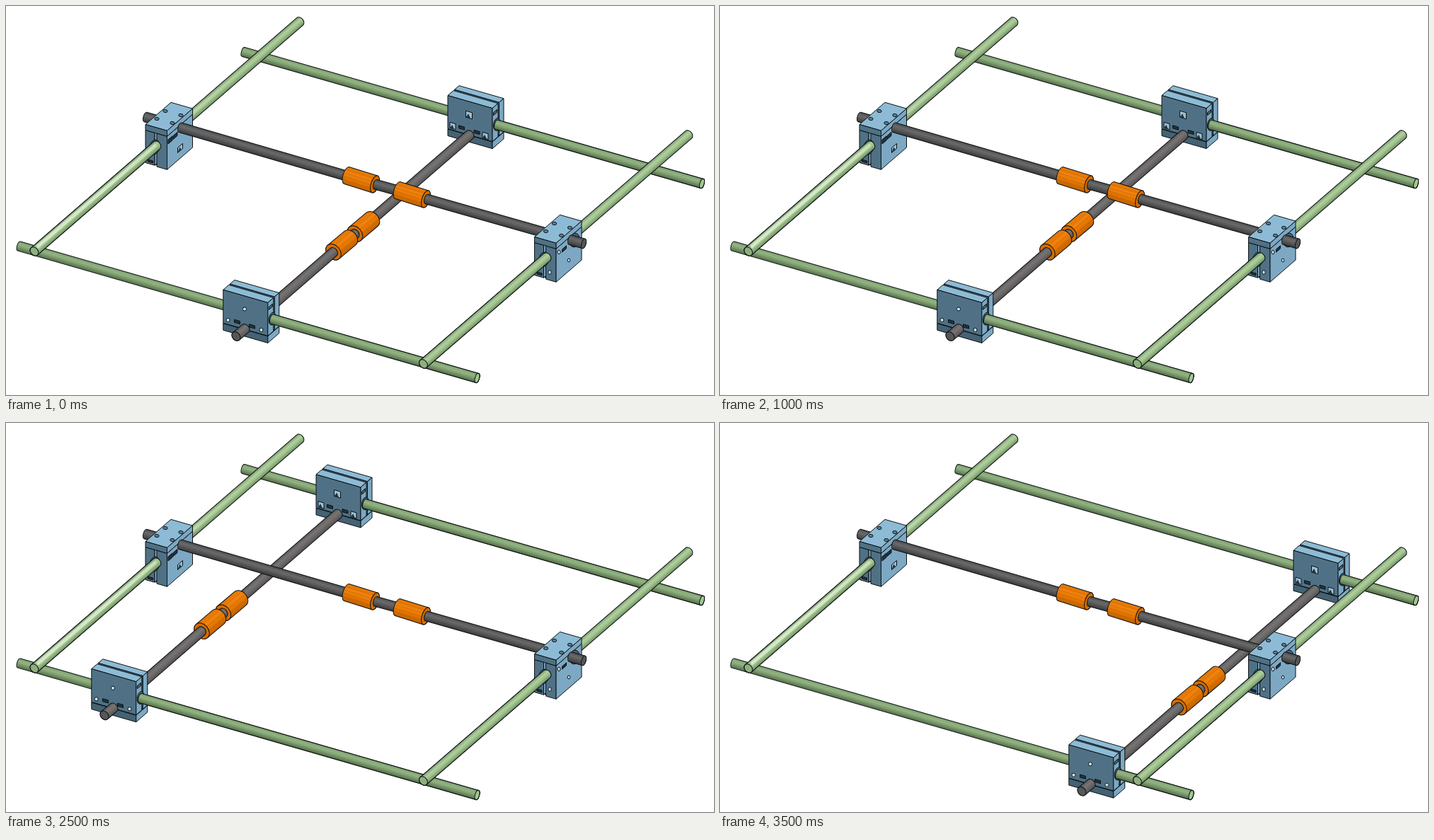
These frames come from a looping animation (1000 by 550 pixels, 4000 ms). An HTML page with a canvas:

```html
<!DOCTYPE html>
<html lang="en">
<head>
<meta charset="utf-8">
<title>Sliding cross gantry</title>
<style>
html, body { margin: 0; width: 100%; height: 100%; overflow: hidden; background: #fff; }
canvas { display: block; width: 1000px; height: 550px; }
</style>
</head>
<body>
<canvas id="stage" width="1000" height="550"></canvas>
<script>
const ctx = document.getElementById('stage').getContext('2d');
const INK = '#0c1114';
const SX = 0.288, SY = -0.866;      // screen slopes of the two floor axes
const CAP = { x: 0.436, y: 0.749 }; // foreshortening of round ends

const GREEN_X = ['#7f9e6e', '#92b482', '#7e9c6f', '#4f6845'];
const GREEN_Y = ['#7d9a6e', '#b0d09f', '#a0c38e', '#718f62'];
const GREY_X = ['#4c4c4c', '#6a6a6a', '#5a5a5a', '#383838'];
const GREY_Y = ['#5a5858', '#787474', '#6e6a6a', '#535151'];
const ORANGE = ['#e27500', '#f08210', '#e67900', '#c06000'];
const TOP = '#8dbbd5', FRONT = '#507185', SIDE = '#7ca8c3';
const SHADE = '#456273', DARK = '#22333d', PALE = '#c9e2f0';

const RAILS = {
  back: { from: [335.5, 65], to: [983, 251] },
  front: { from: [18.5, 339.6], to: [665.5, 526] },
  left: { from: [415, 22], to: [40, 347] },
  right: { from: [964, 182], to: [589.5, 506] }
};

function paint(fill, line = INK, width = 1) {
  if (fill) { ctx.fillStyle = fill; ctx.fill(); }
  if (line) { ctx.strokeStyle = line; ctx.lineWidth = width; ctx.stroke(); }
}

function poly(points, fill, line, width) {
  ctx.beginPath();
  points.forEach(p => ctx.lineTo(p[0], p[1]));
  ctx.closePath();
  paint(fill, line, width);
}

function oval(x, y, rx, ry, fill, angle = 0) {
  ctx.beginPath();
  ctx.ellipse(x, y, rx, ry, angle, 0, 7);
  paint(fill);
}

// Cylinder from its far end to its near, visible end.
function tube(a, b, axis, r, tones, cap, facets = 0) {
  const dx = b[0] - a[0], dy = b[1] - a[1];
  const len = Math.hypot(dx, dy), rx = r * CAP[axis];
  ctx.save();
  ctx.translate(a[0], a[1]);
  ctx.rotate(Math.atan2(dy, dx));
  if (axis === 'y') ctx.scale(1, -1);
  const shade = ctx.createLinearGradient(0, -r, 0, r);
  [0, 0.35, 0.6, 1].forEach((s, i) => shade.addColorStop(s, tones[i]));
  ctx.beginPath();
  ctx.ellipse(0, 0, rx, r, 0, Math.PI / 2, Math.PI * 1.5);
  ctx.ellipse(len, 0, rx, r, 0, -Math.PI / 2, Math.PI / 2);
  ctx.closePath();
  paint(shade);
  for (let i = 1; i <= facets; i++) {
    const y = r * (2 * i / (facets + 1) - 1);
    const x = -rx * Math.sqrt(1 - y * y / r / r);
    ctx.beginPath();
    ctx.moveTo(x, y);
    ctx.lineTo(len + x, y);
    paint(null, 'rgba(150, 72, 0, 0.4)', 0.7);
  }
  ctx.beginPath();
  ctx.ellipse(len, 0, rx, r, 0, 0, 7);
  paint(cap);
  ctx.restore();
}

// Soft reflection that grows toward the near end.
function gleam(a, b) {
  const light = ctx.createLinearGradient(330, 0, 150, 0);
  light.addColorStop(0, 'rgba(240, 252, 232, 0)');
  light.addColorStop(1, 'rgba(240, 252, 232, 0.6)');
  ctx.beginPath();
  ctx.moveTo(a[0] - 1, a[1] - 1);
  ctx.lineTo(b[0] + 4, b[1] - 6.5);
  paint(null, light, 5);
}

const railStyle = axis => axis === 'x' ? [GREEN_X, '#a3c693'] : [GREEN_Y, '#8fae7f'];

function rail(name, axis, startX) {
  const { from, to } = RAILS[name];
  let start = from;
  if (startX !== undefined) {
    const k = (startX - from[0]) / (to[0] - from[0]);
    start = [startX, from[1] + k * (to[1] - from[1])];
  }
  tube(start, to, axis, 6.8, ...railStyle(axis));
  if (name === 'left') gleam(start, to);
}

const rod = (a, b, axis) => tube(a, b, axis, 7, axis === 'x' ? GREY_X : GREY_Y, '#565656');
const sleeve = (a, b, axis) => tube(a, b, axis, 12.5, ORANGE, '#d56c00', axis === 'x' ? 4 : 3);

// Box given by its front top left corner.
function box(x, y, w, d, h, top = TOP, front = FRONT, side = SIDE) {
  const p = (i, j, k) => [x + i + j, y + i * SX + j * SY + k];
  poly([p(0, 0, 0), p(w, 0, 0), p(w, d, 0), p(0, d, 0)], top);
  poly([p(0, 0, 0), p(w, 0, 0), p(w, 0, h), p(0, 0, h)], front);
  poly([p(w, 0, 0), p(w, d, 0), p(w, d, h), p(w, 0, h)], side);
}

// Slanted rectangle lying on an upright face.
function plate(x, y, w, h, slope, fill, line) {
  const s = slope * w / 2;
  poly([[x - w / 2, y - h / 2 - s], [x + w / 2, y - h / 2 + s],
        [x + w / 2, y + h / 2 + s], [x - w / 2, y + h / 2 - s]], fill, line);
}

function nutPocket(x, y, size, slope) {
  plate(x, y, size, size, slope, '#9cc0d4');
  const r = size / 2;
  poly([[x - r, y + r - slope * r], [x - r * 0.2, y - r * 0.4],
        [x + r * 0.5, y + r + slope * r * 0.5]], DARK, null);
}

function wideBlock(x, y) {
  box(x, y + 47.5, 63, 16, 9.5, SHADE, SHADE);
  box(x + 1, y + 1, 61, 15, 46, DARK, DARK, DARK);
  box(x + 9.5, y + 9.5 * SY, 63, 6.5, 47);
  box(x, y, 63, 8, 47);
  oval(x + 69.5, y + 41, 5, 9, SHADE, 0.15);
  plate(x + 67, y + 24, 5, 4, SY, SHADE);
}

function tallBlock(x, y) {
  box(x + 1, y + 8, 29, 35, 45, DARK, DARK, DARK);
  box(x, y + 8, 13, 36, 46);
  box(x + 16, y + 8 + 16 * SX, 14.5, 36, 47);
  oval(x + 13, y + 32, 7, 10.5, SHADE, 0.2);
  plate(x + 7, y + 52, 7, 3, SX, DARK);
  box(x, y, 30.5, 36, 8);
  [[16, -8], [28, -19], [38, -2], [50, -13]].forEach(h =>
    oval(x + h[0], y + h[1], 3.2, 2.1, '#5c8095', 0.1));
}

function bridgeY(dx, dy) {
  ctx.save();
  ctx.translate(dx, dy);
  wideBlock(624, 126.5);
  nutPocket(654, 154, 9, SX);
  nutPocket(631, 169.5, 8, SX);
  nutPocket(677, 183.5, 8, SX);
  plate(643.5, 172, 8, 4, SX, DARK);
  plate(665, 178.5, 8, 4, SX, DARK);
  ctx.restore();
  rail('back', 'x', 693 + dx);

  ctx.save();
  ctx.translate(dx, dy);
  rod([655, 182], [505, 312], 'y');
  sleeve([517, 301.7], [493, 322], 'y');
  rod([493, 322], [480, 333], 'y');
  sleeve([486, 328], [462.5, 347.8], 'y');
  rod([462.5, 347.8], [350, 445.5], 'y');
  wideBlock(306.8, 401.3);
  oval(337, 428.5, 2.6, 2.6, PALE);
  oval(313.5, 444, 2.6, 2.6, PALE);
  oval(360.5, 458, 2.6, 2.6, PALE);
  plate(326.5, 446.5, 8, 4, SX, DARK);
  plate(347.5, 453, 8, 4, SX, DARK);
  ctx.restore();
  rail('front', 'x', 376 + dx);

  ctx.save();
  ctx.translate(dx, dy);
  rod([338, 456], [325, 467], 'y');
  ctx.restore();
}

function bridgeX(dx, dy) {
  ctx.save();
  ctx.translate(dx, dy);
  rod([197, 157], [230, 166.5], 'x');
  tallBlock(197, 167.5);
  nutPocket(246, 201, 7, SY);
  plate(232, 189.5, 6, 6, SY, DARK);
  plate(239, 183.5, 6, 5, SY, DARK);
  ctx.restore();
  rail('left', 'y', 213 + dx);

  ctx.save();
  ctx.translate(dx, dy);
  rod([246, 171.8], [501, 246], 'x');
  sleeve([481.5, 239.6], [521, 252], 'x');
  rod([522, 252.2], [570, 265.5], 'x');
  sleeve([553.5, 260.6], [593, 273], 'x');
  rod([594, 273], [775, 324.5], 'x');
  tallBlock(746.5, 326.5);
  oval(781, 348, 2, 2.8, PALE);
  oval(795, 359.5, 1.8, 2.4, PALE);
  oval(768, 376.5, 2.2, 2.8, PALE);
  plate(788.5, 343.5, 6, 4, SY, DARK);
  oval(803, 331, 7, 10, SHADE, 0.2);
  rod([797, 330.5], [816, 336], 'x');
  ctx.restore();
  rail('right', 'y', 764 + dx);
}

// Each bridge visits both ends of its travel in turn.
const MOVE_X = [0, -1, 0, 1, 0, 0, 0, 0];
const MOVE_Y = [0, 0, 0, 0, 0, -1, 0, 1];

function draw(now) {
  const step = Math.floor((now % 4000) / 500);
  const mx = MOVE_X[step], my = MOVE_Y[step];
  ctx.fillStyle = '#fff';
  ctx.fillRect(0, 0, 1000, 550);
  ctx.lineJoin = 'round';
  rail('back', 'x');
  rail('front', 'x');
  bridgeY(186 * my, 53.7 * my);
  rail('left', 'y');
  rail('right', 'y');
  bridgeX(108 * mx, -93 * mx);
}

const begin = performance.now();
function loop() {
  draw(performance.now() - begin);
  requestAnimationFrame(loop);
}
loop();
</script>
</body>
</html>
```
